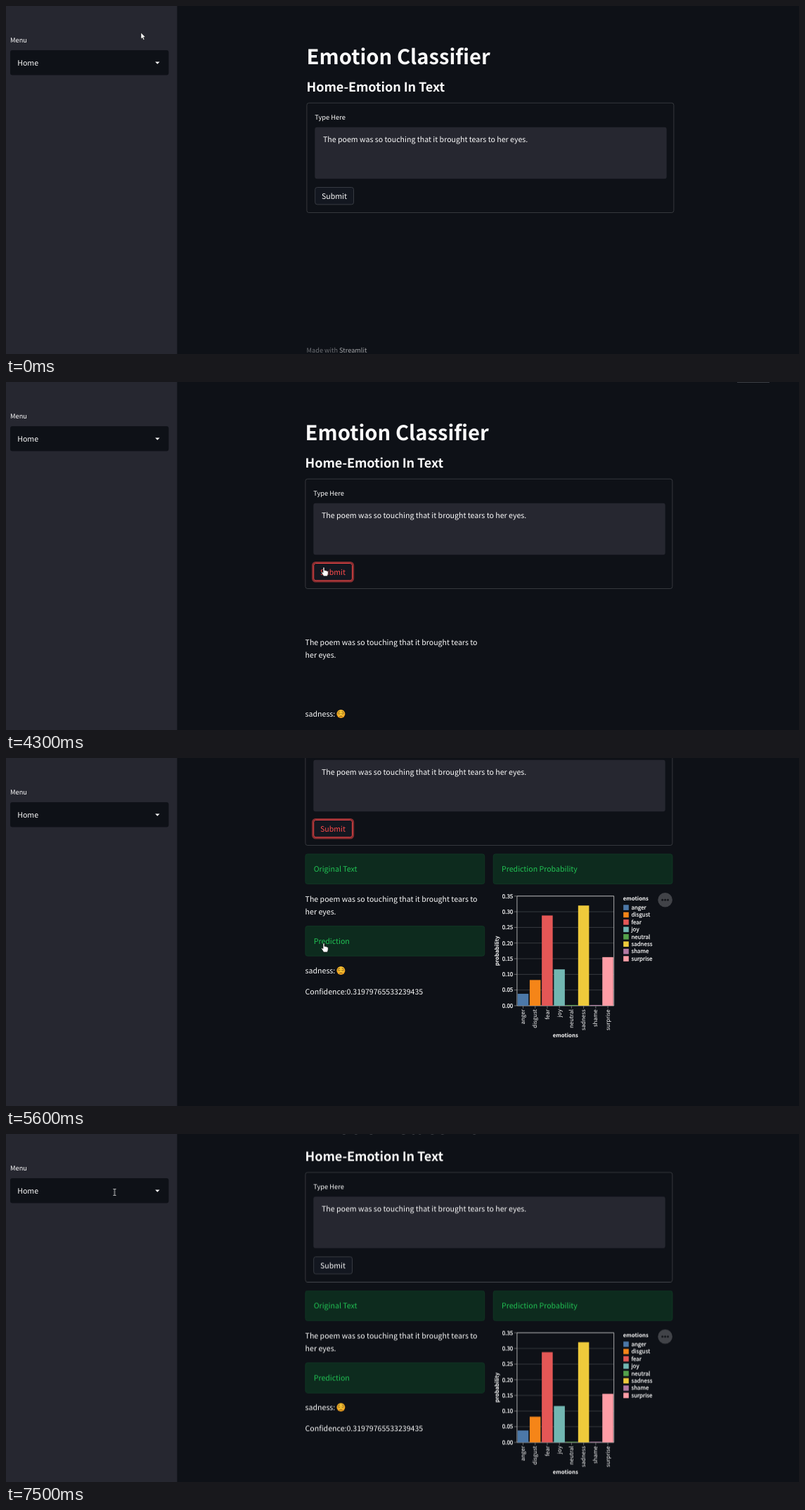
An HTML page that plays this animation: 1128x496 px, repeating every 8 s.

```html
<!DOCTYPE html>
<html lang="en">
<head>
<meta charset="utf-8">
<title>Emotion Classifier</title>
<style>
html, body { margin: 0; width: 100%; height: 100%; overflow: hidden; background: #0e1117; }
svg { display: block; width: 1128px; height: 496px; }
text {
  font: 10.6px "Noto Sans CJK JP", "Noto Sans CJK SC", "Noto Sans CJK", "Open Sans", sans-serif;
  fill: #fafafa; text-rendering: geometricPrecision; white-space: pre;
}
.title { font-size: 29.2px; font-weight: 700; }
.sub { font-size: 18.1px; font-weight: 600; letter-spacing: -.1px; }
.label { font-size: 9.29px; }
.foot { font-size: 9.2px; fill: #6c6e73; }
.alert rect { fill: #0d2b1e; stroke: #133d27; stroke-width: .75; }
.alert text { fill: #21c354; }
.chart text { font-size: 8px; }
.chart .strong { stroke: #fafafa; stroke-width: .22; }
.chart .head { font-size: 7.8px; font-weight: 700; }
.line { fill: none; stroke: #404348; stroke-width: .8; }

.page, .scroll, .cursor, .before, .alert, .chart, .running, .ring, .border, .caption, .arrow, .hand, .beam {
  animation: 8s step-end infinite;
}
.page { animation-name: page; }
.scroll { animation-name: scroll; }
.cursor { animation-name: cursor; }
.before { animation-name: before; }
.alert { animation-name: alert; }
.chart { animation-name: chart; }
.running { animation-name: running; }
.ring { animation-name: ring; }
.border { animation-name: border; }
.caption { animation-name: caption; }
.arrow { animation-name: arrow; }
.hand { animation-name: hand; }
.beam { animation-name: beam; }

/* 1.25% of the loop is 100 ms */
@keyframes page { 0% { transform: translate(2px, 0); } 53.75%, 100% { transform: none; } }
@keyframes scroll {
  0% { transform: translateY(0); }
  63.75% { transform: translateY(-48px); }
  65% { transform: translateY(-108.6px); }
  66.25% { transform: translateY(-151.5px); }
  68.75% { transform: translateY(-163px); }
  70% { transform: translateY(-170px); }
  76.25% { transform: translateY(-163px); }
  77.5% { transform: translateY(-153.5px); }
  80% { transform: translateY(-147px); }
  81.25% { transform: translateY(-132px); }
  82.5% { transform: translateY(-118px); }
  83.75% { transform: translateY(-108px); }
  85% { transform: translateY(-102px); }
  86.25% { transform: translateY(-98.5px); }
  92.5% { transform: translateY(-89px); }
  93.75%, 100% { transform: translateY(-83.5px); }
}
@keyframes cursor {
  0% { transform: translate(192px, 38px); }
  1.25% { transform: translate(201px, 46px); }
  2.5% { transform: translate(225px, 66px); }
  3.75% { transform: translate(259px, 97px); }
  5% { transform: translate(300px, 132px); }
  6.25% { transform: translate(344px, 170px); }
  7.5% { transform: translate(385px, 205px); }
  8.75% { transform: translate(419px, 235px); }
  10% { transform: translate(443px, 256px); }
  11.25% { transform: translate(452px, 264px); }
  92.5% { transform: translate(270px, 154px); }
  93.75%, 100% { transform: translate(154.5px, 83px); }
}
@keyframes before { 0% { opacity: 1; } 53.75%, 100% { opacity: 0; } }
@keyframes alert { 0% { opacity: 0; } 55% { opacity: .35; } 56.25% { opacity: .7; } 57.5%, 100% { opacity: 1; } }
@keyframes chart { 0% { opacity: 0; } 60%, 100% { opacity: 1; } }
@keyframes running { 0% { opacity: 0; } 26.25% { opacity: 1; } 55% { opacity: .5; } 57.5%, 100% { opacity: 0; } }
@keyframes ring { 0% { opacity: 0; } 18.75% { opacity: 1; } 93.75%, 100% { opacity: 0; } }
@keyframes border { 0% { stroke: #3d4047; } 11.25% { stroke: #ff4b4b; } 93.75%, 100% { stroke: #3d4047; } }
@keyframes caption { 0% { fill: #fafafa; } 11.25% { fill: #ff4b4b; } 93.75%, 100% { fill: #fafafa; } }
@keyframes arrow { 0% { opacity: 1; } 11.25% { opacity: 0; } 73.75% { opacity: 1; } 93.75%, 100% { opacity: 0; } }
@keyframes hand { 0% { opacity: 0; } 11.25% { opacity: 1; } 73.75%, 100% { opacity: 0; } }
@keyframes beam { 0% { opacity: 0; } 93.75%, 100% { opacity: 1; } }
</style>
</head>
<body>
<svg viewBox="0 0 1128 496">
  <rect width="1128" height="496" fill="#0e1117"/>
  <g class="page">
    <g class="scroll">
      <text class="title" x="425.6" y="83">Emotion Classifier</text>
      <text class="sub" x="425.6" y="122.3">Home-Emotion In Text</text>

      <rect class="line" x="425.9" y="138.2" width="522" height="156.3" rx="3"/>
      <text class="label" x="437.3" y="162">Type Here</text>
      <rect x="437.3" y="172.8" width="500.4" height="73.4" rx="3" fill="#262730"/>
      <text x="449" y="194.4">The poem was so touching that it brought tears to her eyes.</text>

      <rect class="ring" x="436.3" y="257.1" width="57.6" height="27.2" rx="4" fill="none" stroke="#ff4b4b" stroke-opacity=".5" stroke-width="2.4"/>
      <rect class="border" x="437.7" y="258.5" width="54.8" height="24.4" rx="3" fill="#131720" stroke-width=".9"/>
      <text class="caption" x="447" y="274.9">Submit</text>

      <g class="before">
        <text class="foot" x="425.6" y="493.6">Made with <tspan fill="#a4a5a8">Streamlit</tspan></text>
      </g>

      <g class="alert">
        <rect x="425.9" y="306.9" width="254.8" height="42.6" rx="3"/>
        <text x="437.7" y="332.2">Original Text</text>
        <rect x="693.2" y="306.9" width="254.8" height="42.6" rx="3"/>
        <text x="705" y="332.2">Prediction Probability</text>
        <rect x="425.9" y="409.6" width="254.8" height="42.6" rx="3"/>
        <text x="437.7" y="435">Prediction</text>
      </g>

      <g style="animation: 8s step-end infinite chart-text" id="result">
        <text x="425.6" y="375.2">The poem was so touching that it brought tears to</text>
        <text x="425.6" y="393">her eyes.</text>
        <text x="425.6" y="477.2">sadness:</text>
        <g transform="translate(476.4 473)">
          <circle r="6" fill="url(#face)"/>
          <path d="M-4-.4Q-2.6 1-1.1-.2M1.1-.2Q2.6 1 4-.4M-1.7 3.5Q0 2.2 1.7 3.5M-3.9-2.2L-1.5-3.2M3.9-2.2L1.5-3.2" fill="none" stroke="#5c3a10" stroke-width=".8" stroke-linecap="round"/>
        </g>
        <text x="425.6" y="506.9">Confidence:0.31979765533239435</text>
      </g>

      <g class="chart" id="chart"></g>
    </g>
  </g>

  <rect class="running" x="1040" width="46" height="1" fill="#3b3e45"/>

  <rect width="243.4" height="496" fill="#262730"/>
  <text class="label" x="6" y="52.4">Menu</text>
  <rect x="6" y="63" width="225.4" height="35.5" rx="3" fill="#0e1117"/>
  <text x="16.2" y="85">Home</text>
  <path d="M212.2 79.6H218.6L215.4 82.8Z" fill="#fafafa"/>

  <g class="cursor">
    <path class="arrow" d="M0 0V9L2 7.2L3.5 10.5L5 9.8L3.6 6.6H6.4Z" fill="#fff" stroke="#000" stroke-width=".5"/>
    <path class="hand" d="M-1 .9C-1-.3 1-.3 1 .9V4.6C1.4 4 2.6 4.2 2.8 5C3.4 4.5 4.4 4.8 4.6 5.6C5.4 5.2 6.2 5.7 6.2 6.6V9.2C6.2 10.4 5.4 11 5.2 12.8H-.4C-.8 11-2 10-3.2 8C-3.8 7-2.4 6.2-1 7.8Z" fill="#fff" stroke="#000" stroke-width=".6"/>
    <path class="beam" d="M-2-4.5H-.6L0-4L.6-4.5H2M0-4V4M-2 4.5H-.6L0 4L.6 4.5H2" fill="none" stroke="#e8e8e8" stroke-width=".9"/>
  </g>

  <defs>
    <radialGradient id="face" cy=".4">
      <stop offset=".5" stop-color="#fcc934"/>
      <stop offset="1" stop-color="#f0a020"/>
    </radialGradient>
  </defs>
</svg>
<style>
@keyframes chart-text { 0% { opacity: 0; } 53.75%, 100% { opacity: 1; } }
</style>
<script>
const emotions = [
  ['anger', .038, '#4c78a8'], ['disgust', .082, '#f58518'],
  ['fear', .288, '#e45756'], ['joy', .116, '#72b7b2'],
  ['neutral', .002, '#54a24b'], ['sadness', .3198, '#eeca3b'],
  ['shame', .002, '#b279a2'], ['surprise', .155, '#ff9da6'],
];
const plot = { x: 726.9, y: 366.8, w: 137.8, h: 156.2, max: .35 };
const bottom = plot.y + plot.h;
const right = plot.x + plot.w;
const band = plot.w / emotions.length;
const parts = [];

const rect = (x, y, w, h, fill) =>
  parts.push(`<rect x="${x}" y="${y}" width="${w}" height="${h}" fill="${fill}"/>`);
const path = (d, color) =>
  parts.push(`<path d="${d}" fill="none" stroke="${color}" stroke-width=".75"/>`);
const text = (s, x, y, attrs) =>
  parts.push(`<text x="${x}" y="${y}" ${attrs}>${s}</text>`);
const upright = (s, x, y, attrs) =>
  text(s, 0, 0, `transform="translate(${x} ${y}) rotate(-90)" ${attrs}`);

for (let i = 0; i <= 7; i++) {
  const y = bottom - plot.h * i / 7;
  path(`M${plot.x} ${y}H${right}`, '#45484d');
  path(`M${plot.x - 4} ${y}h4`, '#888');
  text((i * .05).toFixed(2), 721.3, y + 2.8, 'class="strong" text-anchor="end"');
}
path(`M${plot.x} ${plot.y}H${right}V${bottom}H${plot.x}Z`, '#ddd');

emotions.forEach(([name, value, color], i) => {
  const height = plot.h * value / plot.max;
  const middle = plot.x + band * (i + .5);
  rect(plot.x + band * i + .8, bottom - height, band - 1.7, height, color);
  path(`M${middle} ${bottom}v4`, '#888');
  upright(name, middle + 2.6, bottom + 5.2, 'text-anchor="end"');

  const y = 383.1 + 10.43 * i;
  rect(878.2, y - 3.8, 7.6, 7.6, color);
  text(name, 889.4, y + 2.7, 'class="strong"');
});

text('emotions', 877.8, 373.4, 'class="head"');
text('emotions', plot.x + plot.w / 2, 567.7, 'class="head" text-anchor="middle"');
upright('probability', 701, plot.y + plot.h / 2, 'class="head" text-anchor="middle"');

parts.push('<circle cx="937.6" cy="372.2" r="10.3" fill="#414348"/>');
for (const dx of [-3.9, 0, 3.9])
  parts.push(`<circle cx="${937.6 + dx}" cy="372.2" r="1.5" fill="#14161b"/>`);

document.getElementById('chart').innerHTML = parts.join('');
</script>
</body>
</html>
```
